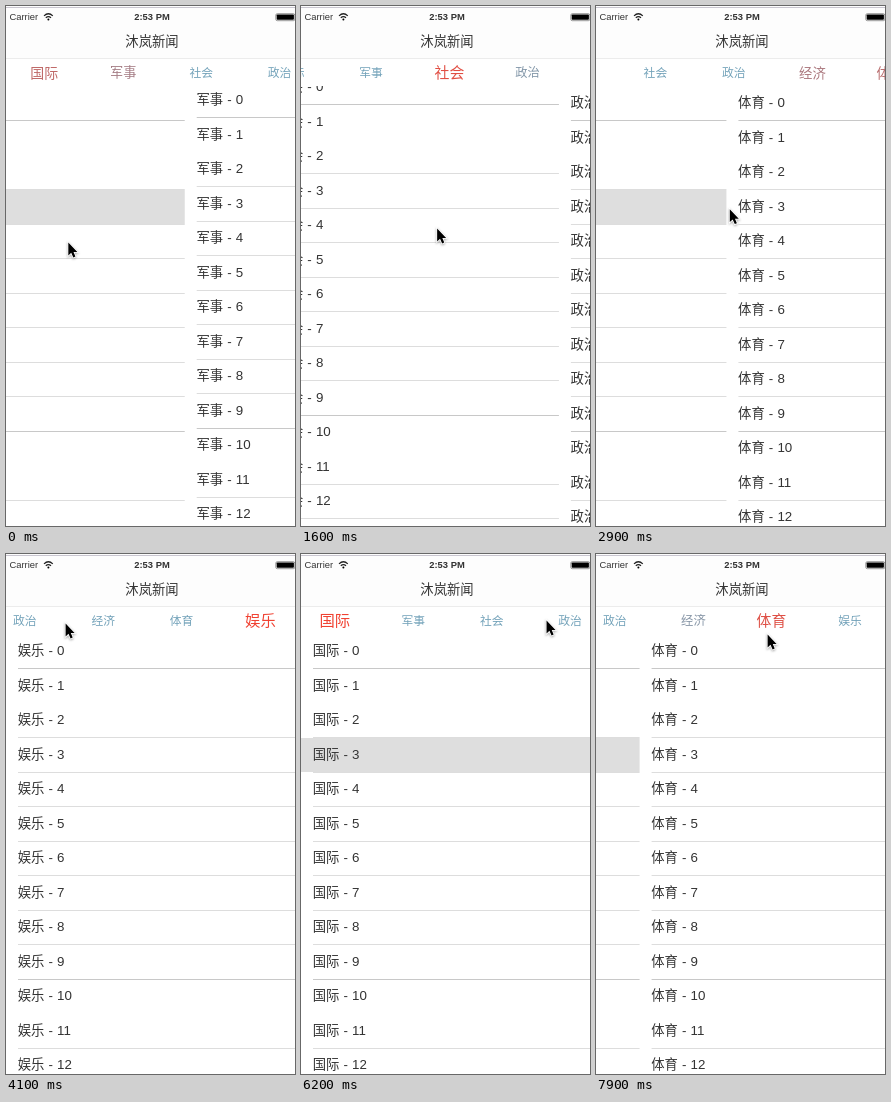
These frames come from a looping animation (289 by 520 pixels, 8000 ms). An HTML page:

```html
<!DOCTYPE html>
<html lang="zh-CN">
<head>
<meta charset="utf-8">
<style>
html, body { margin: 0; width: 100%; height: 100%; overflow: hidden; background: #fff; }
body { font: 13.33px "Liberation Sans", "Noto Sans CJK SC", "Noto Sans CJK", sans-serif; color: #333; }
body * { position: absolute; left: 0; top: 0; white-space: nowrap; }
#stage { width: 289px; height: 520px; overflow: hidden; }
#nav { width: 289px; height: 52px; background: #fdfdfd; border-bottom: 1px solid #ececec; }
#edge { top: 1px; width: 289px; height: 1px; background: #c9c6d0; }
#nav .status { top: 5px; line-height: 12px; font-size: 9.4px; }
.mid { width: 292px; text-align: center; }
#title { top: 26px; line-height: 20px; }
#tabs { left: -.8px; top: 53px; height: 27px; }
#tabs span { width: 78.4px; text-align: center; font-size: 11.8px; line-height: 28px; }
#list { top: 80.3px; width: 289px; height: 439.7px; overflow: hidden; }
#strip { left: -.5px; }
.page { width: 294px; height: 460px; }
.row { width: 294px; height: 34.5px; line-height: 34.5px; padding-left: 12.2px; box-sizing: border-box; word-spacing: .4px; }
.row i { left: 12px; top: 34px; width: 282px; height: 1px; background: #bbb; }
.pick { top: 103.5px; width: 294px; height: 34.5px; background: #dedede; }
svg { overflow: visible; }
#cursor { filter: drop-shadow(0 1px 1px #0005); }
</style>
</head>
<body>
<div id="stage">
  <div id="list"><div id="strip"></div></div>
  <div id="tabs"></div>
  <div id="nav">
    <div id="edge"></div>
    <div class="status" style="left:3.5px">Carrier</div>
    <div class="status mid" style="font-weight:bold">2:53 PM</div>
    <div id="title" class="mid">沐岚新闻</div>
    <svg width="289" height="20">
      <path d="M38 9.9Q42.4 5.6 46.8 9.9M39.8 11.8Q42.4 9.3 45 11.8" fill="none" stroke="#222" stroke-width="1.2"/>
      <circle cx="42.4" cy="13.4" r="1"/>
      <rect x="269.8" y="7.7" width="19" height="7" rx="1.5" fill="none" stroke="#555" stroke-width=".6"/>
      <rect x="270.7" y="8.6" width="17.2" height="5.2" rx=".7"/>
    </svg>
  </div>
  <svg id="cursor" width="12" height="18">
    <path d="M.6 .6V13.4L3.5 10.8 5.6 15.4 7.7 14.5 5.8 10H9.6Z" stroke="#fff" stroke-width="1.6" paint-order="stroke"/>
  </svg>
</div>
<script>
const LOOP = 8000, PAGE = 294, TAB = 78.4, ROW = 34.5, ROWS = 13, MAX_SCROLL = 254.8;
const names = ['国际', '军事', '社会', '政治', '经济', '体育', '娱乐'];
const scrolled = [0, 3, 16];                     // lists that are scrolled down a little
const picked = [0, 3, 4];                        // lists whose fourth row is selected
const swipes = [-294, 650, 1450, 2150, 2530, 2910], SETTLE = 690;
const blue = [116, 163, 186], red = [240, 66, 50];

const clamp = (x, lo, hi) => Math.min(hi, Math.max(lo, x));
const ease = (t, start, span) => {
  const u = clamp((t - start) / span, 0, 1);
  return u * u * (3 - 2 * u);
};
const centred = i => clamp(TAB * (i + .5) - PAGE / 2, 0, MAX_SCROLL);

// Six swipes, then a tap on the first tab and one on the sixth
const pageAt = t => swipes.reduce((p, start) => p + ease(t, start, SETTLE), 0)
  - 6 * ease(t, 5465, 330) + 5 * ease(t, 7605, 330);

// The tab bar centres each page as it lands, then is dragged back and forth
const tabsAt = t => swipes.reduce((x, start, k) =>
  x + (centred(k + 1) - centred(k)) * ease(t, start + SETTLE, 300), 0)
  + MAX_SCROLL * (ease(t, 6150, 650) - ease(t, 4140, 440));

// Cursor stops: [time, x, y]
const stops = swipes.flatMap((start, k) => {
  const press = start + 40, y = 236 - 7 * k;
  const drag = Math.min(360, .6 * ((swipes[k + 1] ?? Infinity) - start));
  return [[press, 165, y], [press + drag, 35, y]];
}).concat([[4000, 59, 69], [4140, 59, 69], [4480, 274, 70], [5300, 32, 65], [5650, 32, 65],
  [6150, 255, 66], [6500, 80, 66], [7100, 152, 65], [7500, 171, 66], [7620, 171, 66], [7900, 171, 80]]);

function cursorAt(t) {
  const next = stops.findIndex(s => s[0] > t);
  if (next < 0) return stops[stops.length - 1].slice(1);
  const a = stops[next - 1], b = stops[next], u = ease(t, a[0], b[0] - a[0]);
  return [1, 2].map(c => a[c] + (b[c] - a[c]) * u);
}

const $ = id => document.getElementById(id);
const tabs = $('tabs'), strip = $('strip'), cursor = $('cursor');

function add(parent, tag, className, style, text = '') {
  const el = document.createElement(tag);
  el.className = className;
  Object.assign(el.style, style);
  el.textContent = text;
  return parent.appendChild(el);
}

// Hairlines come out uneven, repeating every nine rows
const lineAlpha = n => [.8, 0][n % 9] ?? .5;

const picks = [];
const labels = names.map((name, i) => {
  const page = add(strip, 'div', 'page', { left: i * PAGE + 'px', top: -(scrolled[i] ?? 0) + 'px' });
  if (picked.includes(i)) picks.push([add(page, 'div', 'pick', {}), i ? swipes[i - 1] + 550 : 0]);
  for (let n = 0; n < ROWS; n++) {
    const row = add(page, 'div', 'row', { top: n * ROW + 'px' }, `${name} - ${n}`);
    add(row, 'i', '', { opacity: lineAlpha(n) });
  }
  return add(tabs, 'span', '', { left: i * TAB + 'px' }, name);
});

function draw(t) {
  const p = pageAt(t), [x, y] = cursorAt(t);
  strip.style.transform = `translateX(${-p * PAGE}px)`;
  tabs.style.transform = `translateX(${-tabsAt(t)}px)`;
  cursor.style.transform = `translate(${x}px, ${y}px)`;
  labels.forEach((label, i) => {
    const s = Math.max(0, 1 - Math.abs(p - i));
    label.style.transform = `scale(${1 + .3 * s})`;
    label.style.color = `rgb(${blue.map((b, k) => b + (red[k] - b) * s)})`;
  });
  picks.forEach(([el, from]) => el.style.opacity = t >= from ? 1 : 0);
}

function loop() {
  draw(performance.now() % LOOP);
  requestAnimationFrame(loop);
}
loop();
</script>
</body>
</html>
```
